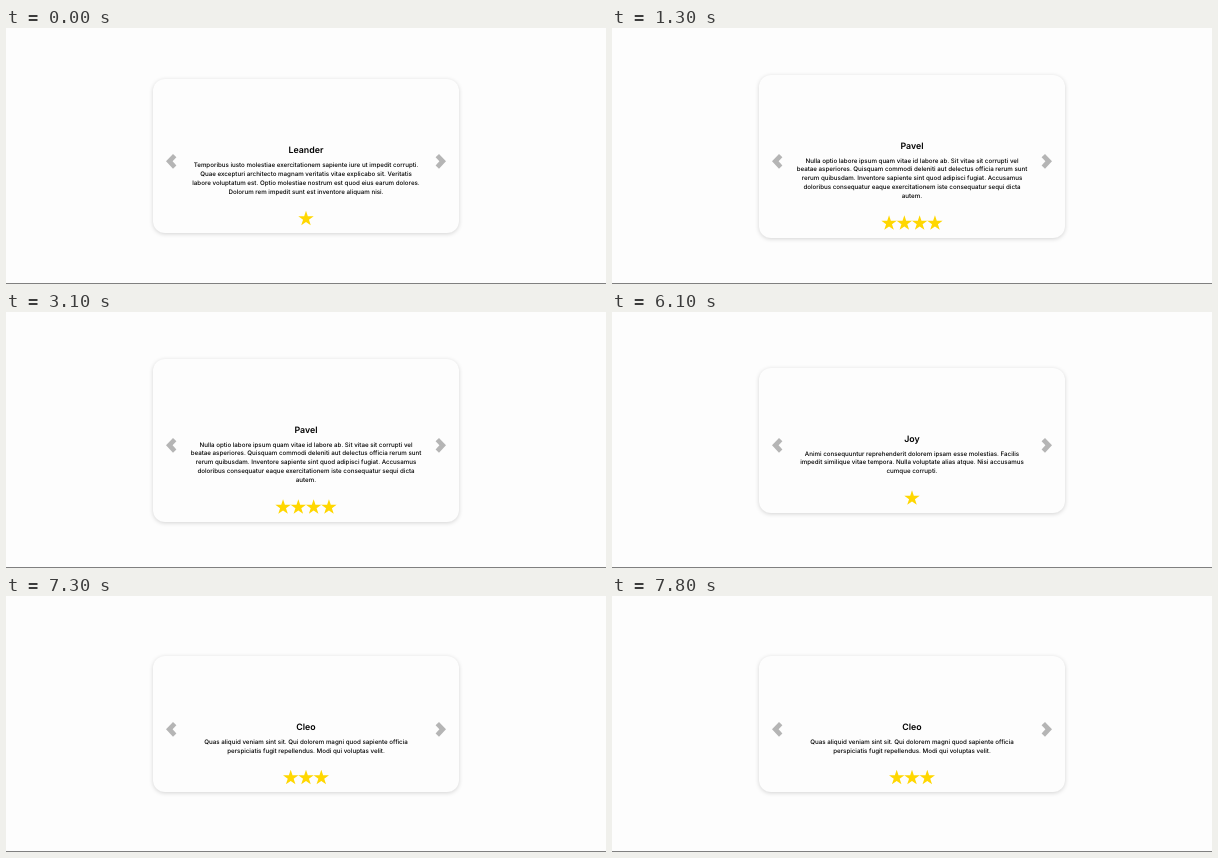
An HTML page that plays this animation: 600x256 px, repeating every 8000 ms.

```html
<!DOCTYPE html>
<html lang="en">
<head>
<meta charset="utf-8">
<title>Review carousel</title>
<style>
  html, body { margin: 0; width: 100%; height: 100%; overflow: hidden; background: #fdfdfd; }
  svg { position: absolute; left: 0; top: 0; width: 600px; height: 256px; }
  #card {
    position: absolute; left: 147px; width: 306px; border-radius: 12px;
    background: #fdfdfd; box-shadow: 0 1px 4px rgba(0, 0, 0, .17);
  }
  text {
    font: 500 6.2px Inter, "Open Sans", sans-serif;
    text-anchor: middle; text-rendering: geometricPrecision; fill: #000;
  }
  #name { font-size: 8.8px; font-weight: 600; }
</style>
</head>
<body>
<div id="card"></div>
<svg viewBox="0 0 600 256">
  <defs><path id="arrow" d="M160 133.3 167 126 170.4 129.2 166.6 133.3 170.4 137.4 167 140.8Z"/></defs>
  <g fill="#b5b5b5">
    <use href="#arrow"/>
    <use href="#arrow" transform="translate(600) scale(-1 1)"/>
  </g>
  <path d="M0 255.5H600" stroke="#808080"/>
  <text id="name" x="300"></text>
  <g id="lines"></g>
  <path id="stars" fill="#ffd700"/>
</svg>
<script>
const LOOP = 8000;
const slides = [
  { start: 0, name: "Leander", stars: 1, lines: [
    "Temporibus iusto molestiae exercitationem sapiente iure ut impedit corrupti.",
    "Quae excepturi architecto magnam veritatis vitae explicabo sit. Veritatis",
    "labore voluptatum est. Optio molestiae nostrum est quod eius earum dolores.",
    "Dolorum rem impedit sunt est inventore aliquam nisi."] },
  { start: 1300, name: "Pavel", stars: 4, lines: [
    "Nulla optio labore ipsum quam vitae id labore ab. Sit vitae sit corrupti vel",
    "beatae asperiores. Quisquam commodi deleniti aut delectus officia rerum sunt",
    "rerum quibusdam. Inventore sapiente sint quod adipisci fugiat. Accusamus",
    "doloribus consequatur eaque exercitationem iste consequatur sequi dicta",
    "autem."] },
  { start: 4300, name: "Joy", stars: 1, lines: [
    "Animi consequuntur reprehenderit dolorem ipsam esse molestias. Facilis",
    "impedit similique vitae tempora. Nulla voluptate alias atque. Nisi accusamus",
    "cumque corrupti."] },
  { start: 7300, name: "Cleo", stars: 3, lines: [
    "Quas aliquid veniam sint sit. Qui dolorem magni quod sapiente officia",
    "perspiciatis fugit repellendus. Modi qui voluptas velit."] }
];
const $ = id => document.getElementById(id);

function star(cx, cy, r) {
  const points = Array.from({ length: 10 }, (_, i) => {
    const a = i * Math.PI / 5, k = i % 2 ? r * 0.382 : r;
    return (cx + k * Math.sin(a)).toFixed(2) + " " + (cy - k * Math.cos(a)).toFixed(2);
  });
  return "M" + points.join("L") + "Z";
}

function show({ name, stars, lines }) {
  const height = 118 + 9 * lines.length;
  const top = 128 - height / 2;
  $("card").style.top = top + "px";
  $("card").style.height = height + "px";
  $("name").textContent = name;
  $("name").setAttribute("y", top + 74.3);
  $("lines").innerHTML = lines.map((line, i) =>
    `<text x="300" y="${top + 88 + 8.95 * i}">${line}</text>`).join("");
  $("stars").setAttribute("d", Array.from({ length: stars }, (_, i) =>
    star(300 + (i - (stars - 1) / 2) * 15.3, top + height - 14.2, 8.1)).join(""));
}

let current;
function frame(now) {
  const t = now % LOOP;
  const slide = slides.findLast(s => s.start <= t);
  if (slide !== current) show(current = slide);
  requestAnimationFrame(frame);
}
frame(0);
</script>
</body>
</html>
```
